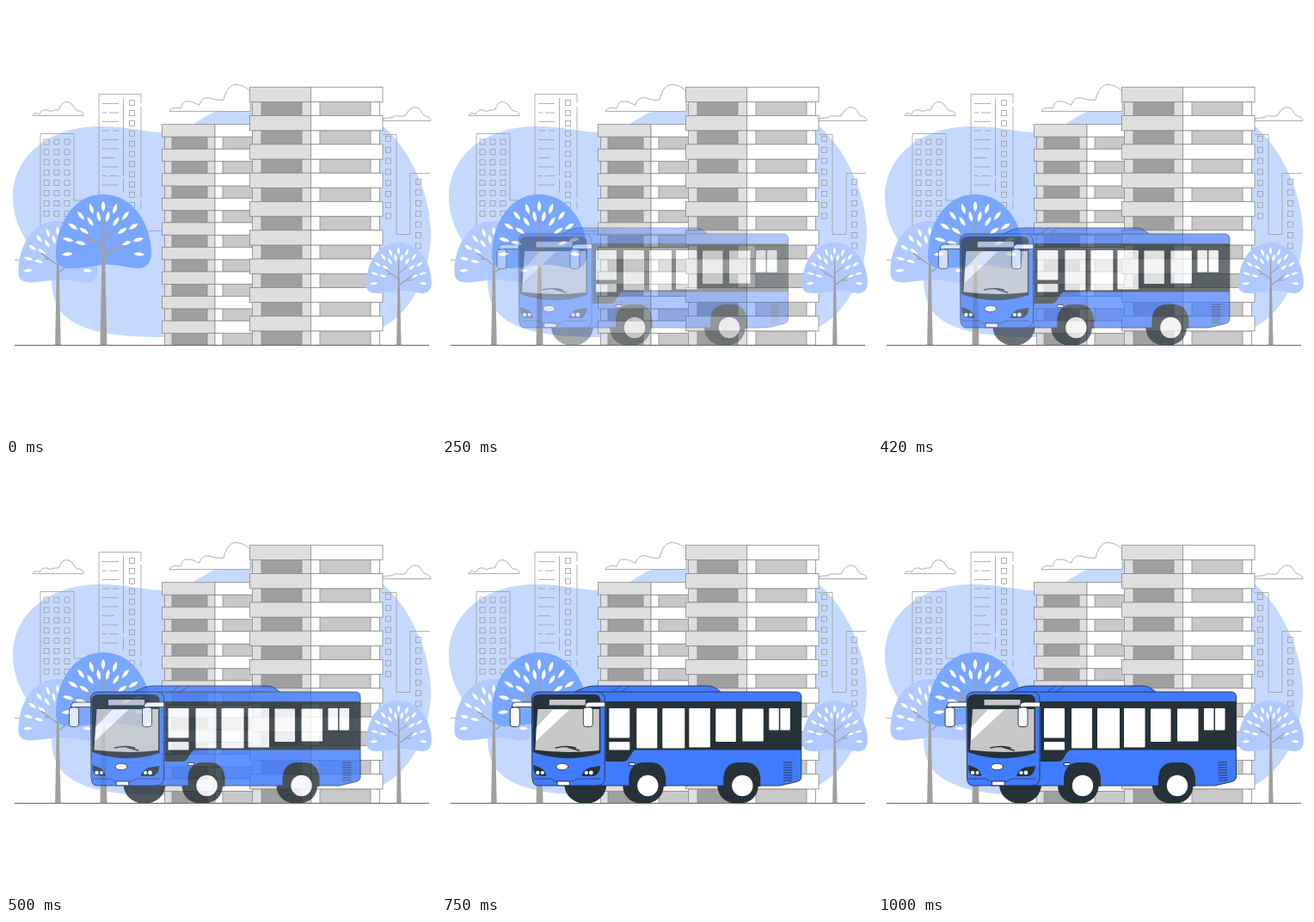
Recreate the animation shown at these times as an HTML page. Size 500x500 px, loop 1.04 s.

```html
<!DOCTYPE html>
<html lang="en">
<head>
<meta charset="utf-8">
<title>City bus</title>
<style>
  html, body { margin: 0; width: 100%; height: 100%; overflow: hidden; background: #fff; }
  svg { display: block; width: 100vw; height: 100vh; }
</style>
</head>
<body>
<svg id="stage" viewBox="0 0 500 500">
  <path fill="#c5d8ff" d="M8 222C8 178 45 142 105 140C140 139 160 147 188 147C212 146 222 132 243 123C300 100 400 115 436 138C460 156 492 205 494 262C494 312 472 356 437 374C380 400 240 387 182 385C130 385 75 380 59 348C52 334 54 322 52 310C38 290 8 265 8 222Z"/>
  <g id="skyline" fill="none" stroke="#999" stroke-width=".75">
    <path d="M40 256V148.500H79V226H91M108 222V102.500H157V113M157 117V223M157 227V236M136.500 107V197M136.500 201V217M157 261.500H182M10 295.500H17M438 149.500H454V265.500H470V194.500H493"/>
    <path d="M112 113.500H131M112 124H117M120 124H131M112 134.500H131M112 145H120M124 145H131M112 155.500H131M112 166H131M112 176.500H126M112 187H131M112 197.500H117M120 197.500H131M112 208H131"/>
  </g>
  <g fill="#fff" stroke="#999" stroke-width=".8">
    <path d="M31 127.500C32 124 36 124 39 126C40 121 47 119 52 123C54 120 60 122 62 120C64 111 72 109 77 115C79 117 80 121 83 122C88 122 90 124 90 127.500Z"/>
    <path d="M190 122.500C192 118 198 118 203 119C205 114 206 110 211 111C217 110 220 114 225 115C227 107 234 105 240 108C245 109 249 110 253 109C256 98 260 91 268 91.500C275 92 280 95 284 99V122.500Z"/>
    <path d="M438 133.500V131C443 129 447 131 450 129C454 126 460 130 465 127C468 119 476 115 481 120C484 123 484 127 488 128C492 129 494 131 494 133.500Z"/>
  </g>
  <g id="towers" stroke="#898989" stroke-width=".8"></g>
  <path d="M10 394.500H492" stroke="#666"/>
  <g id="trees"></g>
  <g id="bus" stroke-linejoin="round" stroke-linecap="round" opacity="0"></g>
</svg>
<script>
const NS = 'http://www.w3.org/2000/svg';
const $ = id => document.getElementById(id);
const skyline = $('skyline'), towers = $('towers'), trees = $('trees'), bus = $('bus');

function add(parent, tag, attrs) {
  const el = document.createElementNS(NS, tag);
  for (const key in attrs) el.setAttribute(key, attrs[key]);
  return parent.appendChild(el);
}
const box = (parent, x, y, width, height, fill, more) =>
  add(parent, 'rect', { x, y, width, height, fill, ...more });
const shape = (parent, d, fill, more) => add(parent, 'path', { d, fill, ...more });

// Columns of small square windows
function windows(x, y, rows, step) {
  for (let i = 0; i < rows; i++) box(skyline, x, y + i * step, 6, 6, 'none');
}
for (const x of [44, 56, 68]) windows(x, 155, 8, 11.9);
windows(143.5, 109.5, 11, 11.9);
windows(441.5, 151.5, 8, 12.8);
windows(476.5, 201.5, 8, 12.4);

// Floors: a projecting balcony slab above a recessed row of glass
function tower(t) {
  for (let i = 0; i < 9; i++) {
    const y = t.top + i * t.step, low = y + t.slab;
    const high = (i === 8 ? 394.3 : y + t.step) - low;
    box(towers, t.in, low, t.mid - t.in, high, '#dedede');
    box(towers, t.dark[0], low, t.dark[1], high, '#9f9f9f');
    box(towers, t.mid, low, t.end - t.mid, high, '#fff');
    box(towers, t.light[0], low, t.light[1], high, '#c8c8c8');
    box(towers, t.x, y, t.mid - t.x, t.slab, '#dedede');
    box(towers, t.mid, y, t.right - t.mid, t.slab, '#fff');
  }
}
tower({ x: 181.5, in: 184.5, mid: 243, end: 287, right: 288, top: 137.7, step: 28.55, slab: 14.4, dark: [193, 41], light: [252, 36] });
tower({ x: 283.5, in: 286.5, mid: 354.5, end: 434.5, right: 438, top: 94.3, step: 33.3, slab: 17.2, dark: [297, 47], light: [365, 59] });

// Tree drawn around the top centre of its crown, then scaled
function tree(x, y, scale, crown) {
  const g = add(trees, 'g', { transform: `translate(${x} ${y}) scale(${scale})` });
  const foot = (394.3 - y) / scale;
  shape(g, 'M-55 72C-55 36-36 0 0 0C36 0 56 37 56 68C56 80 50 87 39 86C26 85 16 81 0 82C-16 84-26 86-38 86C-50 86-55 81-55 72Z', crown);
  for (const [count, rx, ry, spread] of [[11, 42, 51, 95], [8, 27, 40, 78]]) {
    for (let i = 0; i < count; i++) {
      const deg = -spread + 2 * spread * i / (count - 1), a = deg * Math.PI / 180;
      shape(g, 'M0-6.5Q4.500 0 0 6.500Q-4.500 0 0-6.500Z', '#fff', {
        transform: `translate(${rx * Math.sin(a)} ${65 - ry * Math.cos(a)}) rotate(${deg})`
      });
    }
  }
  shape(g, `M-.6 27L-3.500 ${foot}H4.500L1 27Z`, '#a0a0a0');
  shape(g, 'M0 62L-23 45M-10 54L-18 53M0 53L14 41M0 73L26 54M13 64L22 64', 'none', { stroke: '#a0a0a0', 'stroke-width': 1.6 });
}
tree(60, 250, .83, '#b0caff');
tree(113, 219, 1, '#79a6ff');
tree(456.5, 275, .685, '#b0caff');

// Bus, drawn at its resting place
const BLUE = '#407bff', DARK = '#263238', GREY = '#c7c7c7';
const HUBS = [238, 348];
const line = { stroke: DARK, 'stroke-width': .9 };
const pane = (x, y, w, h) => box(bus, x, y, w, h, '#fff', { rx: .8 });

// Tyres sit behind the body
box(bus, 141, 350, 49, 44.3, DARK, { rx: 22 });
for (const cx of HUBS) box(bus, cx - 29, 354, 47.5, 40.3, DARK, { rx: 20 });

shape(bus, 'M150 266C158 264 164 258 177 258H308C315 258 319 262 324 266Z', BLUE, line);
shape(bus, 'M197 265L206 258M207 265L217 258', 'none', { ...line, 'stroke-width': .6 });
shape(bus, 'M103 273Q103 265 112 265H411Q416.500 265 416.500 271V364Q416.500 368 411 369.500L392 374H110Q104 374 103.500 365Z', BLUE, line);
shape(bus, 'M189 276H416.500V332.500H224Q221 333 219 337L215 343Q213 346 209 346H189Z', DARK);

pane(193, 284, 24, 34.5);
pane(193, 323, 24, 9.5);
pane(225, 284, 24, 46.5);
pane(255, 284, 26, 46.5);
pane(286, 284, 24.5, 45.5);
pane(317, 284.5, 23.5, 38.5);
pane(348, 284.5, 24.5, 38);
pane(379, 284, 11.5, 25.5);
pane(392, 284, 11.5, 25.5);

// Front face
shape(bus, 'M181 265Q188 266 188 274V366Q187 374 179 374', 'none', line);
shape(bus, 'M104 276Q104 268 112 268H176Q183 268 183 276V336Q144 349 104.500 335Z', DARK);
shape(bus, 'M110 285H181.500V333Q144 337 107 332.500Z', GREY);
shape(bus, 'M128 285.500H147L108 322L108.500 306Z', '#fff');
box(bus, 123.5, 274, 42, 6.5, GREY);
shape(bus, 'M131 330Q144 327 154 330M144 329L158 333', 'none', { ...line, 'stroke-width': 1.5 });
add(bus, 'ellipse', { cx: 138.5, cy: 352, rx: 7, ry: 3.8, fill: '#fff', ...line });
shape(bus, 'M105 350L113 353Q119 356 120 363L109 362Q105 360 105 350Z', DARK);
shape(bus, 'M183 351L170 353Q163 356 161 363L175 363Q182 361 183 351Z', DARK);
for (const [cx, r] of [[110, 2.2], [115.5, 2], [166.5, 2.1], [172, 2.4]])
  add(bus, 'circle', { cx, cy: 359, r, fill: '#fff' });
shape(bus, 'M106 366H126L130 369H150L156 366H183', 'none', { ...line, 'stroke-width': .7 });
box(bus, 133, 369, 14, 4.8, '#fff', line);

// Mirrors with their arms
for (const x of [78, 163]) {
  shape(bus, `M${x + 25} 277H${x + 7}Q${x + 2} 277 ${x + 2} 283H${x + 6}Q${x + 6} 282.500 ${x + 9} 282.500H${x + 25}Z`, '#fff', line);
  box(bus, x, 283, 11, 22.5, '#fafafa', { rx: 3, ...line });
}

box(bus, 216.5, 347.5, 6.5, 3, '#fff', line);
for (let y = 347; y < 370; y += 3) shape(bus, `M396 ${y}H405.500`, 'none', line);

// Arches and hubs
for (const cx of HUBS) {
  shape(bus, `M${cx - 22} 375V364Q${cx - 20} 347 ${cx - 4} 347H${cx + 5}Q${cx + 19} 348 ${cx + 21} 365V375Z`, DARK);
  add(bus, 'circle', { cx, cy: 374, r: 12.2, fill: '#fff' });
}

// Drive-in: [ms, offset in px]; opacity follows the offset
const LOOP = 1040, TICK = 1000 / 24, REACH = 24;
const path = [[40, -22.2], [250, -14], [333, -11], [417, -7.6], [583, -1.3], [667, .6], [750, 1.3], [833, 1.2], [920, .6], [1000, 0]];

function offsetAt(ms) {
  const i = Math.max(1, path.findIndex(p => p[0] >= ms - .01));
  const [a, from] = path[i - 1], [b, to] = path[i];
  return from + (to - from) * (ms - a) / (b - a);
}

const start = performance.now();
function draw() {
  const t = (performance.now() - start) % LOOP;
  const step = Math.min(24, Math.floor((t + 5) / TICK));
  const x = step ? offsetAt(step * TICK) : -REACH;
  bus.setAttribute('transform', `translate(${x.toFixed(2)} 0)`);
  bus.setAttribute('opacity', Math.min(1, 1 + x / REACH).toFixed(3));
  requestAnimationFrame(draw);
}
draw();
</script>
</body>
</html>
```
